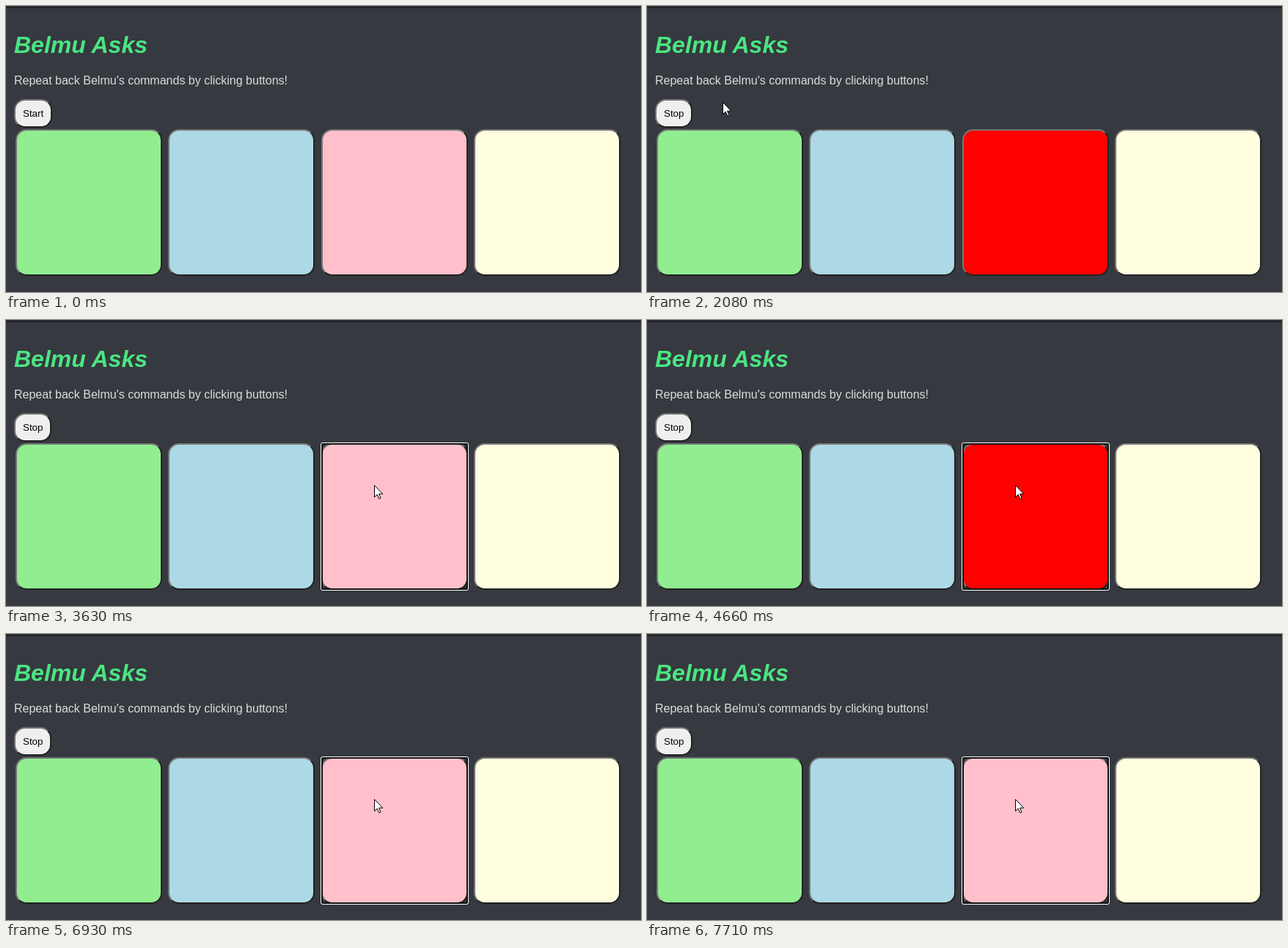
Animation of 866 by 390 pixels, one loop 8 s. Source, as an HTML page:

```html
<!DOCTYPE html>
<html lang="en">
<head>
<meta charset="utf-8">
<title>Belmu Asks</title>
<style>
  html, body { margin: 0; width: 100%; height: 100%; overflow: hidden; background: #36393f; }
  #stage {
    position: relative; width: 866px; height: 390px; overflow: hidden;
    background: #36393f; color: #dcdcdc; font-family: "Liberation Sans", Arial, sans-serif;
  }
  #stage > * { position: absolute; margin: 0; white-space: nowrap; }
  #bar { left: 0; top: 0; width: 866px; height: 2px; background: #2b2c2f; border-bottom: 1px solid #1d1e21; }
  h1 { left: 11px; top: 35px; font: italic bold 32px/37px "Liberation Sans", Arial, sans-serif; color: #4be582; }
  p { left: 11px; top: 93px; font-size: 16px; line-height: 18px; }
  .btn {
    box-sizing: border-box; border: 2px solid; border-radius: 15px;
    border-color: #767676 #222 #222 #767676;
  }
  #toggle {
    left: 11px; top: 127px; padding: 10px; background: #efefef; color: #000;
    font-size: 13.3333px; line-height: 15px;
  }
  .pad { top: 168px; width: 200px; height: 200px; }
  svg { left: 0; top: 0; }
</style>
</head>
<body>
<div id="stage">
  <div id="bar"></div>
  <h1>Belmu Asks</h1>
  <p>Repeat back Belmu's commands by clicking buttons!</p>
  <div id="toggle" class="btn">Start</div>
  <div class="btn pad" style="left:13px;background:lightgreen"></div>
  <div class="btn pad" style="left:221px;background:lightblue"></div>
  <div id="red" class="btn pad" style="left:430px;background:pink"></div>
  <div class="btn pad" style="left:638px;background:lightyellow"></div>
  <svg width="866" height="390" viewBox="0 0 866 390">
    <g id="ring" fill="none">
      <rect x="431" y="169" width="198" height="198" rx="1.5" stroke="#101010" stroke-width="2"/>
      <rect x="429.5" y="167.5" width="201" height="201" rx="2.5" stroke="#fff"/>
    </g>
    <path id="cursor" d="M.5 .5V16.6L4.2 13.1L6.8 18.8L9 17.8L6.5 12.2H11.7Z"
          fill="#fff" stroke="#000" stroke-width="1"/>
  </svg>
</div>
<script>
const LOOP = 8000;
const $ = id => document.getElementById(id);
const toggle = $('toggle'), red = $('red'), ring = $('ring'), cursor = $('cursor');

// Spans in which the third pad is lit: prompts and clicks
const lit = [[2080, 2590], [3550, 3630], [4660, 5600], [5970, 6930], [7460, 7540], [7630, 7710]];

// Pointer moves: start, end, number of positions, first progress, from, bend, to
const moves = [
  { a: 270, b: 790, n: 7, first: 0, path: [[640, 347], [300, 215], [34, 134]] },
  { a: 1560, b: 1710, n: 3, first: 0.3, path: [[34, 134], [70, 133], [103, 131]] },
  { a: 2590, b: 3180, n: 8, first: 0.04, path: [[103, 131], [270, 112], [502, 225]] }
];

const smooth = u => u * u * (3 - 2 * u);

function bend([p, q, r], u) {
  const v = 1 - u;
  return [0, 1].map(k => Math.round(v * v * p[k] + 2 * u * v * q[k] + u * u * r[k]));
}

function pointer(t) {
  const m = moves.filter(m => t >= m.a).pop();
  if (!m) return null;
  const gaps = m.n - 1;
  const step = Math.min(gaps, Math.floor((t - m.a) / (m.b - m.a) * gaps + 1e-6));
  return bend(m.path, m.first + (1 - m.first) * smooth(step / gaps));
}

function draw(t) {
  const label = t < 1090 ? 'Start' : 'Stop';
  if (toggle.textContent !== label) toggle.textContent = label;
  red.style.background = lit.some(([a, b]) => t >= a && t < b) ? 'red' : 'pink';
  ring.style.display = t >= 3550 ? '' : 'none';
  const pos = pointer(t);
  cursor.style.display = pos ? '' : 'none';
  if (pos) cursor.setAttribute('transform', `translate(${pos})`);
}

const start = performance.now();
function tick(now) {
  draw(Math.max(0, now - start) % LOOP);
  requestAnimationFrame(tick);
}
draw(0);
requestAnimationFrame(tick);
</script>
</body>
</html>
```
